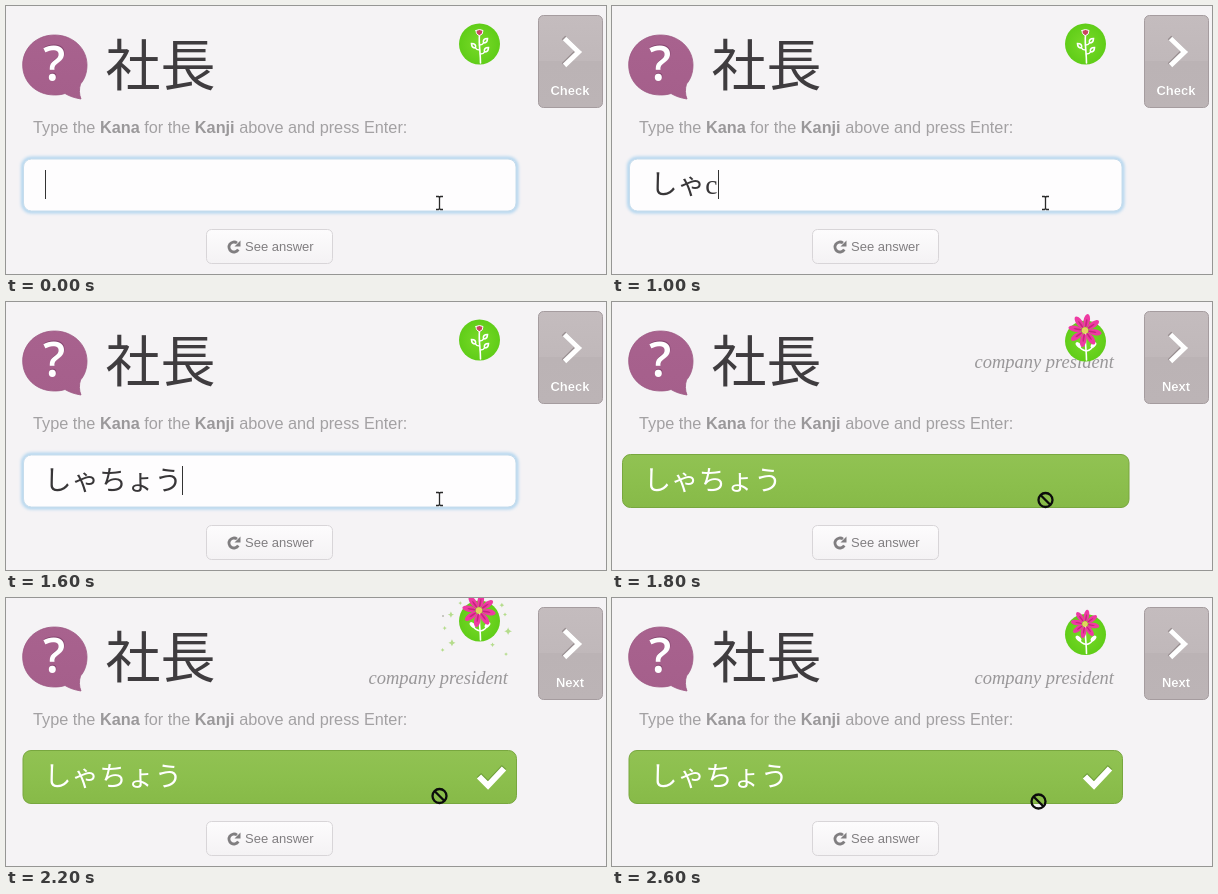
An HTML page that plays this animation: 600x268 px, repeating every 2.7 s.

```html
<!DOCTYPE html>
<html lang="ja">
<head>
<meta charset="utf-8">
<title>Kana quiz</title>
<style>
  html, body { margin: 0; width: 100%; height: 100%; overflow: hidden; background: #f5f3f5; }
  svg { display: block; width: 600px; height: 268px; }
  text { font-family: "Liberation Sans", Arial, sans-serif; white-space: pre; }
  .kanji { font: 300 55px "Noto Sans CJK JP", "Noto Sans CJK", sans-serif; fill: #3f3c3f; }
  .kana { font: 300 27.6px "Liberation Serif", "Noto Sans CJK JP", "Noto Sans CJK", serif; }
  .mark { font: 600 49px "Open Sans", sans-serif; text-anchor: middle; }
  .hint { font-size: 16.27px; fill: #a3a1a3; }
  .hint tspan { font-weight: 700; fill: #9a989a; }
  .meaning { font: italic 18.5px "Liberation Serif", serif; fill: #999799; text-anchor: end; }
  .label { font-weight: 700; font-size: 13px; text-anchor: middle; }
  .see { font-size: 13px; fill: #807e80; }
</style>
</head>
<body>
<svg viewBox="0 0 600 268">
  <defs>
    <linearGradient id="plum" x2="0" y2="1">
      <stop offset="0" stop-color="#a8628e"/><stop offset="1" stop-color="#a55f8b"/>
    </linearGradient>
    <linearGradient id="taupe" x2="0" y2="1">
      <stop offset="0" stop-color="#c4bcbe"/><stop offset=".5" stop-color="#c0b8ba"/>
      <stop offset=".5" stop-color="#bbb3b5"/><stop offset="1" stop-color="#bcb4b6"/>
    </linearGradient>
    <linearGradient id="pale" x2="0" y2="1">
      <stop offset="0" stop-color="#fdfcfd"/><stop offset="1" stop-color="#f4f2f4"/>
    </linearGradient>
    <linearGradient id="grass" x2="0" y2="1">
      <stop offset="0" stop-color="#91c253"/><stop offset=".5" stop-color="#8cbf4d"/>
      <stop offset="1" stop-color="#87ba48"/>
    </linearGradient>
    <radialGradient id="lime">
      <stop offset="0" stop-color="#79da29"/><stop offset="1" stop-color="#60cd18"/>
    </radialGradient>
    <filter id="glow" x="-5%" y="-30%" width="110%" height="160%"><feGaussianBlur stdDeviation="1.8"/></filter>
    <path id="star" d="M0-6Q.9-.9 6 0Q.9.9 0 6Q-.9.9-6 0Q-.9-.9 0-6Z"/>
  </defs>
  <rect width="600" height="268" fill="#f5f3f5"/>

  <path fill="url(#plum)" stroke="#9c5883" stroke-width=".8" d="M48.500 29C67 29 81 42.500 81 59C81 67 78.500 73.500 74.500 78C73 83 73 88 75 93C68.500 92 63 90 59 87.500C56 88.500 52.500 89 48.500 89C30 89 16.700 76 16.700 59C16.700 42.500 30 29 48.500 29Z"/>
  <text class="mark" x="48.500" y="73.500" fill="#84456f">?</text>
  <text class="mark" x="48" y="75" fill="#fff">?</text>
  <text class="kanji" x="99.500" y="79">社長</text>

  <text class="hint" x="27" y="127">Type the <tspan>Kana</tspan> for the <tspan>Kanji</tspan> above and press Enter:</text>

  <g>
    <rect x="532.500" y="9.500" width="64" height="92" rx="5" fill="url(#taupe)" stroke="#a59c9f"/>
    <g fill="none" stroke-width="5">
      <path d="M557.500 31.500L571.500 45L557.500 59" stroke="#988e90"/>
      <path d="M558.500 32.500L572.500 46L558.500 59.500" stroke="#fff"/>
    </g>
    <text class="label" x="564" y="88.500" fill="#8b8284" data-label></text>
    <text class="label" x="564" y="89.400" fill="#fff" data-label></text>
  </g>

  <text class="meaning" id="meaning" x="502">company president</text>

  <g id="badge">
    <circle r="20.500" fill="url(#lime)"/>
    <g fill="none" stroke="#fff" stroke-width="1.600" stroke-linecap="round">
      <path d="M0-9C-1 0 1 8 1 19"/>
      <g id="sprout">
        <path d="M0 6Q-3 6-4 4Q-8 4-8-.500Q-3-.500-4 4M0 1Q3 1 4-1Q8-1 8-5.500Q3-5.500 4-1M1 10Q4 10 5 8Q9 8 9 3.500Q4 3.500 5 8"/>
        <path d="M-3.500-13.500L0-14.500L3.500-13.500Q3.500-9 0-8.500Q-3.500-9-3.500-13.500Z" fill="#c9455f" stroke-width="1"/>
      </g>
      <g id="plant">
        <path d="M1 10Q-5 9-7 4M1 10Q6 9 8 4"/>
        <ellipse cx="-7" cy="4" rx="3.500" ry="2" transform="rotate(45 -7 4)" fill="#fff" stroke="none"/>
        <ellipse cx="8" cy="4" rx="3.500" ry="2" transform="rotate(-45 8 4)" fill="#fff" stroke="none"/>
      </g>
    </g>
    <g id="bloom"></g>
  </g>
  <g id="sparkles" fill="#b5dc8c"></g>

  <g id="entry">
    <rect x="17" y="152.500" width="493.500" height="53" rx="8" fill="none" stroke="#b3d6ef" stroke-width="4" filter="url(#glow)"/>
    <rect x="17.500" y="153" width="492.500" height="52" rx="8" fill="#fefdfe" stroke="#c6dcec"/>
  </g>
  <g id="solved">
    <rect id="bar" y="152.500" height="53" rx="8" fill="url(#grass)" stroke="#78a73f"/>
    <g id="tick" fill="none" stroke-width="6">
      <path d="M473 177L482 186L498 169" stroke="#6f9f39"/>
      <path d="M473 178.500L482 187.500L498 170.500" stroke="#fff"/>
    </g>
  </g>
  <text class="kana" id="typed" y="188"></text>
  <path id="caret" d="M0 164V193" stroke="#333"/>

  <rect x="200.500" y="223.500" width="126" height="34" rx="5" fill="url(#pale)" stroke="#d8d5d8"/>
  <path d="M232.300 243.500A5 5 0 1 1 231 237" fill="none" stroke="#807e80" stroke-width="2.800"/>
  <path d="M234.500 234.500V240.500H228.500Z" fill="#807e80"/>
  <text class="see" x="239" y="245">See answer</text>

  <path id="beam" d="M430 190.500H432.500L433.500 191.500L434.500 190.500H437M433.500 191.500V202.500M430 203.500H432.500L433.500 202.500L434.500 203.500H437" fill="none" stroke="#2a2a2a" stroke-width="1.300"/>
  <g id="blocked" fill="none" stroke="#0c0c0c" stroke-width="2.300">
    <circle r="7"/><path d="M-5-5L5 5"/>
  </g>
</svg>
<script>
const LOOP = 2700, STEP = 100, SOLVED = 1800;
const $ = id => document.getElementById(id);
const show = (el, on) => el.setAttribute('visibility', on ? 'visible' : 'hidden');
const move = (el, x, y, s = 1) => el.setAttribute('transform', `translate(${x} ${y}) scale(${s})`);

// [time, text, caret visible]
const typing = [
  [0, '', true], [200, 's', true], [400, 'sh', true], [600, 'しゃ', true],
  [800, 'しゃ', false], [1000, 'しゃc', true], [1200, 'しゃch', true],
  [1300, 'しゃちょ', true], [1500, 'しゃちょう', false], [1600, 'しゃちょう', true]
];

// Keys are [time, value] pairs
function track(keys, t) {
  const i = keys.findIndex(k => k[0] >= t);
  if (i < 0) return keys[keys.length - 1][1];
  if (i === 0) return keys[0][1];
  const [[t0, a], [t1, b]] = [keys[i - 1], keys[i]];
  return a + (b - a) * (t - t0) / (t1 - t0);
}
const badgeY = [[1800, 39], [1900, 27], [2000, 20], [2200, 23], [2400, 31], [2500, 34.5], [2600, 36.5]];
const bloomSize = [[1800, 1.05], [2000, 1.16], [2400, .95], [2600, .9]];
const meaningY = [[1800, 66], [1900, 78], [2000, 86]];
const widen = [[1800, 6.5], [1900, 3], [2000, 0]];
const tickAlpha = [[1800, 0], [1900, .5], [2000, 1]];
const spread = [[1800, .3], [1900, .75], [2000, 1], [2300, 1.06]];
const glitter = [[1800, 0], [1900, .7], [2000, 1], [2100, .9], [2300, .4], [2400, 0]];

const petals = (n, rx, ry, cy, fill) => Array.from({length: n}, (_, i) =>
  `<ellipse transform="rotate(${i * 360 / n + 10})" cy="${-cy}" rx="${rx}" ry="${ry}" fill="${fill}"/>`).join('');
$('bloom').innerHTML = petals(8, 3, 6.5, 9.5, '#ee3aa2') +
  petals(8, .8, 4, 7, '#c9247f') + '<circle r="3" fill="#e3d45c"/>';

// [x, y, size]
const stars = [
  [446, 17, .8], [440, 30, .55], [447, 44, .9], [438, 51, .5], [455, 6, .5],
  [495, 8, .6], [498, 17, .5], [501, 33, 1], [486, 46, .6], [499, 55, .5]
];
$('sparkles').innerHTML = stars.map(() => '<use href="#star"/>').join('') +
  '<circle cx="437" cy="18" r="1" fill="#b9b9b0"/>';
const sparks = $('sparkles').querySelectorAll('use');
const labels = document.querySelectorAll('[data-label]');

function render(t) {
  const done = t >= SOLVED;
  const [, text, caretOn] = typing.filter(k => k[0] <= t).pop();
  const grow = done ? track(widen, t) : 0;
  const left = 38 - grow;

  $('typed').textContent = text;
  $('typed').setAttribute('x', left);
  $('typed').setAttribute('fill', done ? '#fff' : '#383638');
  const end = text ? $('typed').getComputedTextLength() : 0;
  move($('caret'), Math.floor(left + end) + 1.5, 0);
  show($('caret'), caretOn && !done);
  show($('entry'), !done);
  show($('solved'), done);
  $('bar').setAttribute('x', 17 - grow);
  $('bar').setAttribute('width', 493.5 + grow * 2);
  $('tick').setAttribute('opacity', track(tickAlpha, t));

  labels.forEach(l => l.textContent = done ? 'Next' : 'Check');
  show($('meaning'), done);
  $('meaning').setAttribute('y', track(meaningY, t));

  const y = done ? track(badgeY, t) : 38;
  move($('badge'), 473.5, y);
  show($('sprout'), !done);
  show($('plant'), done);
  show($('bloom'), done);
  move($('bloom'), -.5, -10.5, track(bloomSize, t));

  const far = track(spread, t), shine = track(glitter, t);
  show($('sparkles'), t > SOLVED && t <= 2400);
  sparks.forEach((s, i) => {
    const [sx, sy, size] = stars[i];
    move(s, 473 + (sx - 473) * far, 28 + (sy - 28) * far, size * shine);
  });

  show($('beam'), !done);
  show($('blocked'), done);
  const drift = track([[2400, 0], [2600, 1]], t);
  move($('blocked'), 433.5 - 7 * drift, 198 + 5.5 * drift);
}

function tick() {
  render(Math.floor(performance.now() % LOOP / STEP) * STEP);
  requestAnimationFrame(tick);
}
tick();
</script>
</body>
</html>
```
